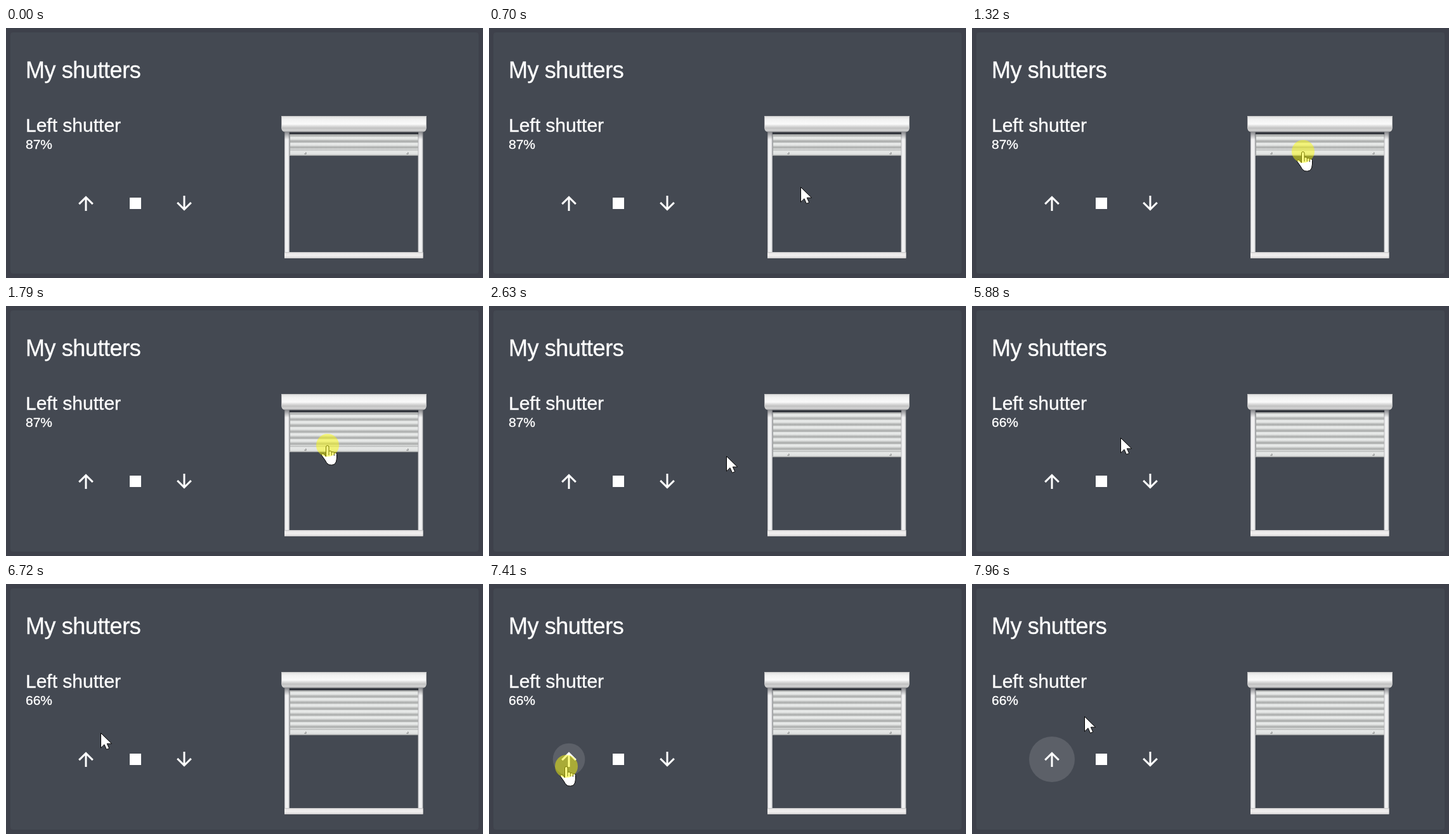
An HTML page with a canvas that plays this animation: 752x395 px, repeating every 8000 ms.

```html
<!DOCTYPE html>
<html lang="en">
<head>
<meta charset="utf-8">
<title>Shutter card</title>
<style>
html, body { margin: 0; width: 100%; height: 100%; overflow: hidden; background: #3e414b; }
canvas { display: block; }
</style>
</head>
<body>
<canvas id="stage" width="752" height="395"></canvas>
<script>
const ctx = document.getElementById('stage').getContext('2d');
const LOOP = 8000;
const FONT = '"Liberation Sans", Arial, sans-serif';

const icons = {
  up: new Path2D('M13 20H11V8L5.5 13.5 4.08 12.08 12 4.16 19.92 12.08 18.5 13.5 13 8Z'),
  stop: new Path2D('M18 18H6V6H18Z'),
  down: new Path2D('M11 4H13V16L18.5 10.5 19.92 11.92 12 19.84 4.08 11.92 5.5 10.5 11 16Z')
};
const arrow = new Path2D('M.5.5V24L6 18.7 9.5 26.5 13.7 24.7 10.3 17.2H17.6Z');
const hand = new Path2D('M7.5 18V3Q7.5.5 9.8.5T12 3V9.5Q16 8 16.2 11 20 9.7 20.3 12 24.5 11 24.5 14.5V20' +
  'Q24.3 27 21 30 17 32 12 30.8 8 28.5 6 23.5L1 16.5Q-.2 13.5 2.8 13.3 5 14 7.5 18Z');
const knuckles = new Path2D('M12 9.5V16M16.2 11V16M20.3 12V16.5');

const mix = (a, b, u) => a + (b - a) * u;
const easeOut = u => 1 - (1 - u) ** 2;
const easeInOut = (u, power) => u < .5 ? (2 * u) ** power / 2 : 1 - (2 - 2 * u) ** power / 2;

// Number of ticks done (0..count) of a move whose ticks run from first to last.
function ticks(t, first, last, count) {
  if (t < first) return 0;
  return Math.min(count, 1 + Math.floor((t - first) / (last - first) * (count - 1) + .04));
}

function along(from, to, u, bendX = 0, bendY = 0) {
  const bend = 4 * u * (1 - u);
  return {
    x: Math.round(mix(from[0], to[0], u) + bendX * bend),
    y: Math.round(mix(from[1], to[1], u) + bendY * bend)
  };
}

function pointer(t) {
  const handle = [522, 195], dropped = [498, 228], aside = [374, 237];
  const above = [149.6, 235], button = [122, 288];
  if (t < 470) return null;
  if (t < 1320) return along([428, 366], handle, easeOut((ticks(t, 470, 1010, 8) - 1) / 7));
  if (t < 2320) return along(handle, dropped, (ticks(t, 1320, 1940, 9) - 1) / 8, 4);
  if (t < 5490) return along(dropped, aside, easeOut(ticks(t, 2320, 2630, 5) / 5));
  if (t < 6720) return along(aside, above, easeInOut(ticks(t, 5490, 6250, 11) / 11, 3), 0, -30);
  if (t < 7640) return along(above, button, easeInOut(ticks(t, 6720, 7030, 5) / 5, 5));
  return along(button, [177, 209], easeOut(ticks(t, 7640, 7960, 5) / 5));
}

function shutterBottom(t) {
  if (t < 1390) return 202;
  return pointer(Math.min(t, 1990)).y + 11;
}

function isOverControl(p, bottom) {
  const onHandle = p.x > 447 && p.x < 649 && p.y > bottom - 30 && p.y < bottom + 2;
  return onHandle || Math.hypot(p.x - 126, p.y - 277) < 36;
}

function gradient(x0, y0, x1, y1, stops) {
  const g = ctx.createLinearGradient(x0, y0, x1, y1);
  stops.forEach(([at, color]) => g.addColorStop(at, color));
  return g;
}

function box(x, y, w, h, fill) {
  ctx.fillStyle = fill;
  ctx.fillRect(x, y, w, h);
}

function disc(x, y, r, fill) {
  ctx.fillStyle = fill;
  ctx.beginPath();
  ctx.arc(x, y, r, 0, 2 * Math.PI);
  ctx.fill();
}

function label(text, y, size, spacing = 0) {
  ctx.fillStyle = ctx.strokeStyle = '#fff';
  ctx.lineWidth = .35;
  ctx.font = `${size}px ${FONT}`;
  ctx.letterSpacing = `${spacing}px`;
  ctx.fillText(text, 31, y);
  ctx.strokeText(text, 31, y);
}

function icon(path, x) {
  ctx.save();
  ctx.translate(x - 18, 259);
  ctx.scale(1.5, 1.5);
  ctx.fillStyle = '#fff';
  ctx.fill(path);
  ctx.restore();
}

function drawSlats(bottom) {
  const pitch = 9.6, barTop = bottom - 10;
  ctx.save();
  ctx.beginPath();
  ctx.rect(447, 168, 203, bottom - 168);
  ctx.clip();
  for (let y = barTop - 2; y > 168 - pitch; y -= pitch) {
    box(447, y, 203, pitch + .5, gradient(0, y, 0, y + pitch, [
      [0, '#c9cbca'], [.25, '#eceeed'], [.55, '#dcdedd'], [.8, '#aeb0af'], [1, '#b6b8b7']
    ]));
  }
  box(447, barTop, 203, 10, gradient(0, barTop, 0, bottom, [
    [0, '#a3a5a5'], [.12, '#d2d4d3'], [.3, '#e6e8e7'], [.8, '#dddfde'], [.9, '#a9abab'], [1, '#8d9091']
  ]));
  for (const x of [472, 633]) {
    disc(x, bottom - 4, 2, '#a3a5a4');
    disc(x - 1, bottom - 5, 1, '#f2f2f2');
  }
  box(447, 168, 1, bottom - 168, '#9a9c9d');
  ctx.restore();
}

function drawFrame() {
  const post = [[0, '#b4b4b6'], [.2, '#ececee'], [.55, '#f6f6f6'], [.85, '#dcdcde'], [1, '#96989c']];
  const shade = gradient(0, 164, 0, 176, [[0, 'rgba(60,62,68,.6)'], [1, 'rgba(60,62,68,0)']]);
  for (const x of [439, 649.5]) {
    box(x, 162, 8, 201, gradient(x, 0, x + 8, 0, post));
    box(x, 162, 8, 14, shade);
  }
  box(439, 354, 218.5, 10, gradient(0, 354, 0, 364, [
    [0, '#b9b9bb'], [.15, '#e6e4e4'], [.5, '#f2f0f0'], [.85, '#e2e0e0'], [1, '#b8b8ba']
  ]));
  box(447, 164, 203, 4, '#34373e');

  ctx.beginPath();
  ctx.moveTo(434, 139);
  ctx.lineTo(663, 139);
  ctx.lineTo(663, 158);
  ctx.quadraticCurveTo(662, 164, 657, 164.5);
  ctx.lineTo(440, 164.5);
  ctx.quadraticCurveTo(435, 164, 434, 158);
  ctx.closePath();
  ctx.fillStyle = gradient(0, 139, 0, 164.5, [
    [0, '#b9b9b9'], [.06, '#e2e2e2'], [.2, '#f1f1f1'], [.5, '#fafafa'],
    [.62, '#dedede'], [.75, '#c2c2c2'], [.9, '#d4d4d4'], [1, '#909194']
  ]);
  ctx.fill();
  box(434, 140, 1, 18, '#bcbcbe');
  box(662, 140, 1, 18, '#bcbcbe');
}

function drawPointer(p, isHand) {
  ctx.save();
  ctx.translate(p.x - (isHand ? 10 : 0), p.y);
  const shape = isHand ? hand : arrow;
  ctx.fillStyle = '#fff';
  ctx.strokeStyle = '#000';
  ctx.lineWidth = 1;
  ctx.fill(shape);
  ctx.stroke(shape);
  if (isHand) ctx.stroke(knuckles);
  ctx.restore();
}

function draw(t) {
  box(0, 0, 752, 395, '#3e414b');
  ctx.fillStyle = '#444952';
  ctx.beginPath();
  ctx.roundRect(7, 7, 738, 381, 4);
  ctx.fill();

  label('My shutters', 79, 36, -.432);
  label('Left shutter', 164, 30);
  label(t < 5030 ? '87%' : '66%', 191, 21);

  const press = ticks(t, 7410, 7640, 4);
  if (press) disc(126, 277, mix(20, 36, Math.min(1, press / 3)), 'rgba(255,255,255,.125)');
  icon(icons.up, 126);
  icon(icons.stop, 204);
  icon(icons.down, 281);

  const bottom = shutterBottom(t);
  drawSlats(bottom);
  drawFrame();

  const p = pointer(t);
  if (!p) return;
  drawPointer(p, isOverControl(p, bottom));
  const held = (t >= 1320 && t < 2170) || (t >= 7410 && t < 7565);
  if (held) disc(p.x, p.y, 18, 'rgba(255,255,0,.47)');
}

const start = performance.now();
function loop() {
  draw((performance.now() - start) % LOOP);
  requestAnimationFrame(loop);
}
loop();
</script>
</body>
</html>
```
